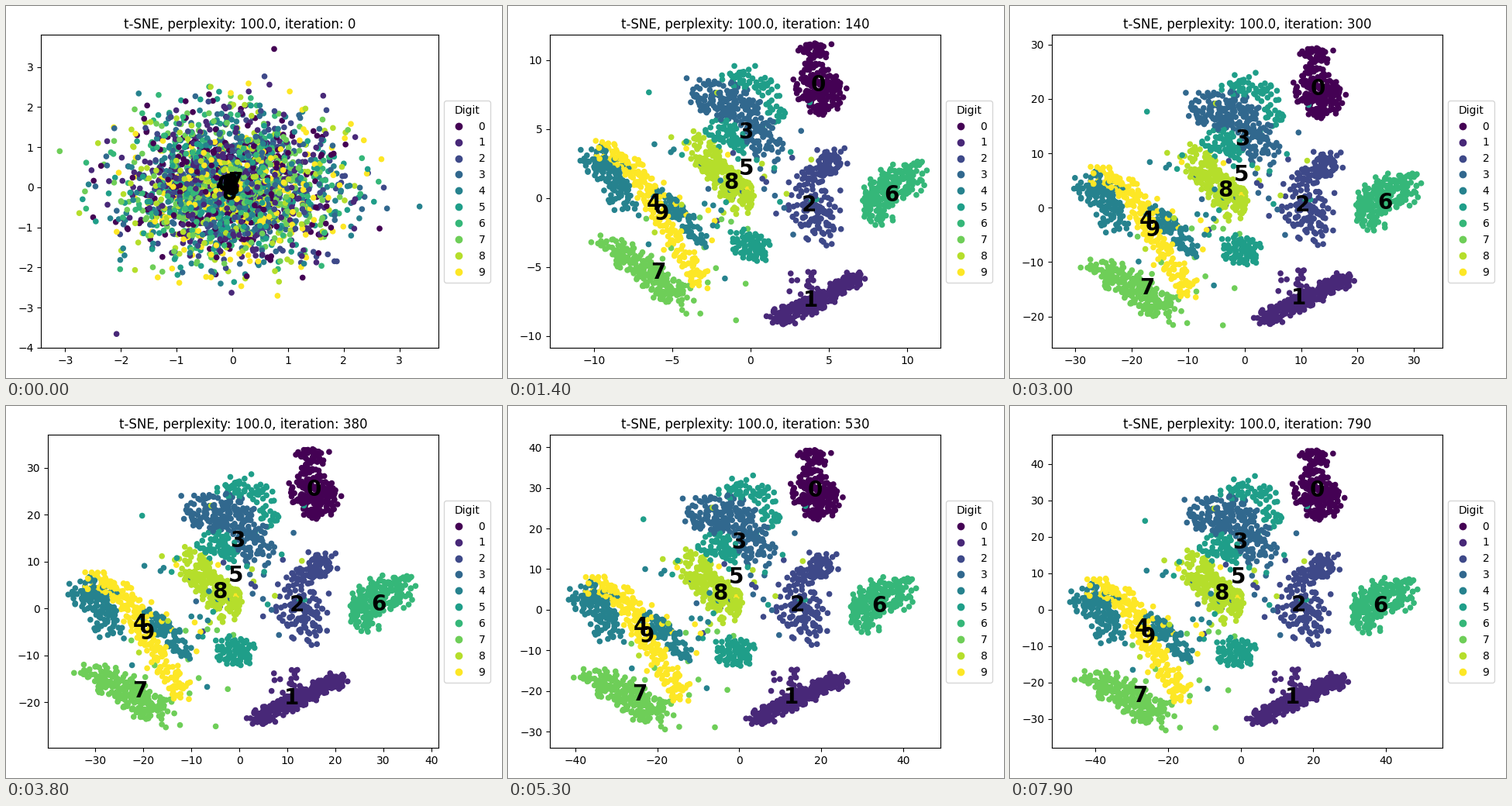
A matplotlib script for the animation above (8 s loop, 640 by 480 pixels).

```python
import numpy as np
import matplotlib.pyplot as plt
from matplotlib.animation import FuncAnimation

FRAMES, STEP = 80, 100
LEFT, RIGHT, TOP, BOTTOM = 54, 558, 38, 441
SETTLE = 1.4  # seconds until the clusters have formed
CENTRE = np.array([297, 240])

rng = np.random.default_rng(7)
labels, clusters = [], []


def add(digit, pts):
    labels.append(np.full(len(pts), digit))
    clusters.append(pts)


def disc(n, radius):
    r = radius * np.sqrt(rng.random(n)) * (1 + 0.12 * rng.normal(size=n))
    a = 2 * np.pi * rng.random(n)
    return np.column_stack([r * np.cos(a), r * np.sin(a)])


def stroke(digit, n, radius, *path):
    """Scatter n points evenly along a path on the stage."""
    path = np.array(path, float)
    along = np.r_[0, np.cumsum(np.hypot(*np.diff(path, axis=0).T))]
    s = along[-1] * rng.random(n)
    spine = np.column_stack([np.interp(s, along, c) for c in path.T])
    add(digit, spine + disc(n, radius))


def strays(digit, n, spread=50):
    middle = 0.65 * ANCHORS[digit] + 0.35 * CENTRE
    add(digit, rng.normal(middle, spread, (n, 2)).clip((80, 75), (530, 415)))


# Where each caption and cluster comes to rest, in stage pixels.
ANCHORS = np.array([(396, 107), (364, 373), (372, 254), (297, 174), (170, 285),
                    (294, 219), (478, 256), (168, 371), (273, 240), (178, 296)])

stroke(0, 60, 16, (382, 72), (400, 69))
stroke(0, 190, 27, (388, 106), (404, 128))
stroke(1, 270, 11, (314, 406), (350, 388), (400, 363), (428, 354))
stroke(1, 16, 14, (340, 356), (385, 348))
stroke(2, 100, 16, (370, 232), (400, 209), (414, 201))
stroke(2, 100, 27, (362, 255), (392, 270), (380, 290))
stroke(3, 220, 24, (240, 140), (295, 140), (326, 190))
stroke(4, 150, 21, (94, 248), (124, 262), (127, 294))
stroke(4, 90, 13, (180, 275), (205, 300), (230, 320))
stroke(5, 85, 18, (277, 318), (305, 320))
stroke(5, 70, 14, (280, 110), (325, 105), (342, 152))
stroke(5, 70, 20, (260, 182), (284, 192))
stroke(6, 235, 22, (458, 280), (464, 250), (514, 243))
stroke(7, 230, 21, (104, 352), (140, 365), (165, 385), (195, 401))
stroke(8, 220, 20, (236, 203), (255, 235), (282, 248), (285, 270))
stroke(9, 220, 15, (106, 234), (150, 250), (172, 298), (203, 343), (224, 376))
for d in (2, 3, 4, 5, 7, 8, 9):
    strays(d, 14)

labels, end = np.concatenate(labels), np.concatenate(clusters)
order = rng.permutation(len(labels))
labels, end = labels[order], end[order]


def before_drift(p):
    """Place of a settled point when the clusters have just formed."""
    u, v = ((p - CENTRE) / (200, 160)).T
    dx = 15 + 13 * v
    dy = 6 * v - 34 * np.abs(u - 0.38) ** 1.2
    return p + np.column_stack([dx, dy])


def to_frac(p):
    """Stage pixels to fractions of the axes box."""
    return (p - (LEFT, BOTTOM)) / (RIGHT - LEFT, TOP - BOTTOM)


# Seconds, then the axis limits: x low, x high, y low, y high
LIMITS = np.array([(0, -3.435, 3.70, -4.01, 3.80),
                   (0.2, -0.7, 0.7, -0.7, 0.7),
                   (1, -3.7, 3.5, -3.2, 3.5),
                   (1.4, -12.82, 12.13, -10.86, 11.82),
                   (2.2, -25.52, 25.47, -19.96, 23.99),
                   (3.8, -39.84, 41.45, -29.72, 37.0),
                   (5.3, -46.2, 49.1, -34.03, 43.02),
                   (7.9, -51.95, 55.57, -37.99, 48.0)])


def warp(t):
    """Time scale on which the spread grows nearly evenly."""
    return np.minimum(t, 1) + np.log1p(10 * np.maximum(t - 1, 0))


def limits(t):
    v = [np.interp(warp(t), warp(LIMITS[:, 0]), c) for c in LIMITS[:, 1:].T]
    return np.array(v[::2]), np.array(v[1::2])


class Swarm:
    """Moves from a random cloud to clusters, which then drift to rest."""

    def __init__(self, cloud, rest):
        low, high = limits(0)
        self.cloud = (cloud - low) / (high - low)
        self.formed = to_frac(before_drift(rest))
        self.rest = to_frac(rest)

    def at(self, t):
        if t < SETTLE:
            k = min(t / 0.6, 1)
            a, b, w = self.cloud, self.formed, k * k * (3 - 2 * k)
        else:
            a, b, w = self.formed, self.rest, 1 - np.exp((SETTLE - t) / 1.45)
        low, high = limits(t)
        return low + (a + w * (b - a)) * (high - low)


cloud = rng.normal(0, 0.92, (len(labels), 2))
cloud[np.hypot(*cloud.T) > 2.9] *= 0.7
# The four points that set the opening limits.
for d, spot in {0: (0.75, 3.45), 1: (-2.08, -3.66),
                4: (3.36, -0.48), 7: (-3.1, 0.9)}.items():
    cloud[np.argmax(labels == d)] = spot

points = Swarm(cloud, end)
names = Swarm(rng.normal(0, 0.08, (10, 2)), ANCHORS + (0, 2.8))

fig, ax = plt.subplots(figsize=(6.4, 4.8), dpi=100)
dots = ax.scatter(*cloud.T, s=20, c=labels, cmap="viridis", vmin=0, vmax=9)
ax.legend(*dots.legend_elements(num=None), title="Digit", loc="center left",
          bbox_to_anchor=(1, 0.5))
captions = [ax.text(0, 0, str(d), size=20, weight="bold", color="black",
                    ha="center", va="center") for d in range(10)]


def draw(i):
    t = i * STEP / 1000
    dots.set_offsets(points.at(t))
    for text, pos in zip(captions, names.at(t)):
        text.set_position(pos)
    (x0, y0), (x1, y1) = limits(t)
    ax.set(xlim=(x0, x1), ylim=(y0, y1),
           title=f"t-SNE, perplexity: 100.0, iteration: {10 * i}")
    fig.tight_layout()
    return [dots, *captions]


anim = FuncAnimation(fig, draw, frames=FRAMES, interval=STEP, repeat=True)
plt.show()
```
